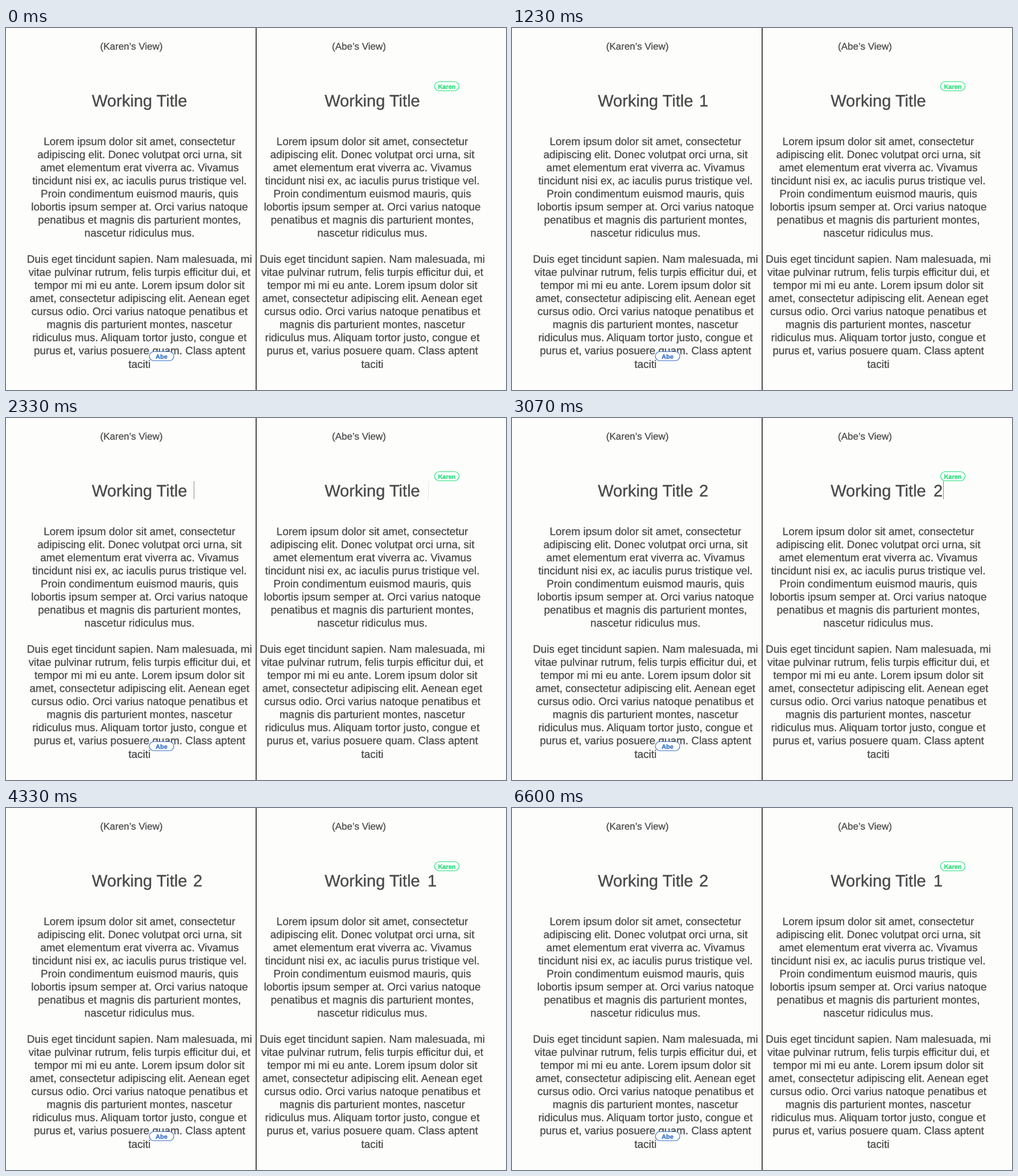
Recreate the animation shown at these times as an HTML page. Size 879 by 637 pixels, loop 6630 ms.

```html
<!DOCTYPE html>
<html lang="en">
<head>
<meta charset="utf-8">
<title>Two views of one document</title>
<style>
  html, body { margin: 0; width: 100%; height: 100%; overflow: hidden; background: #fdfdfc; }
  svg { display: block; }
  text {
    font-family: "Liberation Sans", Arial, sans-serif; font-size: 18.95px;
    fill: #4a4a4a; stroke: #4a4a4a; stroke-width: .3px;
    text-rendering: geometricPrecision;
  }
  .mid { text-anchor: middle; }
  .head { font-size: 17px; }
  .title { font-size: 29.1px; stroke-width: .4px; }
  .tag { font-size: 11px; font-weight: bold; }
</style>
</head>
<body>
<svg id="stage" width="879" height="637" viewBox="0 0 879 637"></svg>
<script>
const LOOP = 6630;
const stage = document.getElementById("stage");
const LINES = `Lorem ipsum dolor sit amet, consectetur
adipiscing elit. Donec volutpat orci urna, sit
amet elementum erat viverra ac. Vivamus
tincidunt nisi ex, ac iaculis purus tristique vel.
Proin condimentum euismod mauris, quis
lobortis ipsum semper at. Orci varius natoque
penatibus et magnis dis parturient montes,
nascetur ridiculus mus.

Duis eget tincidunt sapien. Nam malesuada, mi
vitae pulvinar rutrum, felis turpis efficitur dui, et
tempor mi mi eu ante. Lorem ipsum dolor sit
amet, consectetur adipiscing elit. Aenean eget
cursus odio. Orci varius natoque penatibus et
magnis dis parturient montes, nascetur
ridiculus mus. Aliquam tortor justo, congue et
purus et, varius posuere quam. Class aptent
taciti`.split("\n");

function add(name, attrs, content = "") {
  const el = document.createElementNS("http://www.w3.org/2000/svg", name);
  for (const key in attrs) el.setAttribute(key, attrs[key]);
  el.textContent = content;
  return stage.appendChild(el);
}

function addTag(x, y, name, color) {
  add("rect", { x, y, width: 43, height: 16, rx: 8, fill: "#fff", stroke: color, "stroke-width": 1.2 });
  add("text", { x: x + 21.5, y: y + 12, class: "mid tag", style: `fill:${color};stroke:${color}` }, name);
}

function addView(center, headX, owner, digitX) {
  add("text", { x: headX, y: 38, class: "mid head" }, `(${owner}’s View)`);
  add("text", { x: center, y: 138, class: "mid title" }, "Working Title");
  LINES.forEach((line, i) =>
    add("text", { x: center, y: 205.5 + i * 23.06, class: "mid" }, line));
  return {
    x: digitX,
    digit: add("text", { x: digitX, y: 137.5, class: "title" }),
    caret: add("rect", { y: 111, width: 1, height: 32, fill: "#4a4a4a" })
  };
}

const left = addView(234.7, 220.5, "Karen", 329);
const right = addView(644, 620.5, "Abe", 741);
add("rect", { x: 439, y: 0, width: 1.4, height: 637, fill: "#000" });
addTag(753.5, 94.5, "Karen", "#24dd78");
addTag(252, 569.5, "Abe", "#3a74c8");

// Each edit is [time, digit shown from then on].
const leftEdits = [[0, ""], [600, "1"], [1450, ""], [2700, "2"]];
const rightEdits = [[0, ""], [2900, "2"], [3500, ""], [3900, "1"]];

const clamp = v => Math.max(0, Math.min(1, v));
const digitAt = (edits, t) => edits.filter(edit => edit[0] <= t).pop()[1];

// The caret fades in and out between two times.
const pulse = (t, from, to) => clamp((t - from) / 120) * clamp((to - t) / 120);

function show(view, digit, opacity) {
  view.digit.textContent = digit;
  view.caret.setAttribute("x", view.x + (digit ? 17 : 1));
  view.caret.setAttribute("opacity", opacity);
}

function draw(now) {
  const t = now % LOOP;
  const blink = t < 2800 ? pulse(t % 1000, 230, 785) : 0;
  show(left, digitAt(leftEdits, t), blink * 0.75);
  show(right, digitAt(rightEdits, t), pulse(t, 2310, 3450) * 0.65);
  requestAnimationFrame(draw);
}
draw(0);
</script>
</body>
</html>
```
